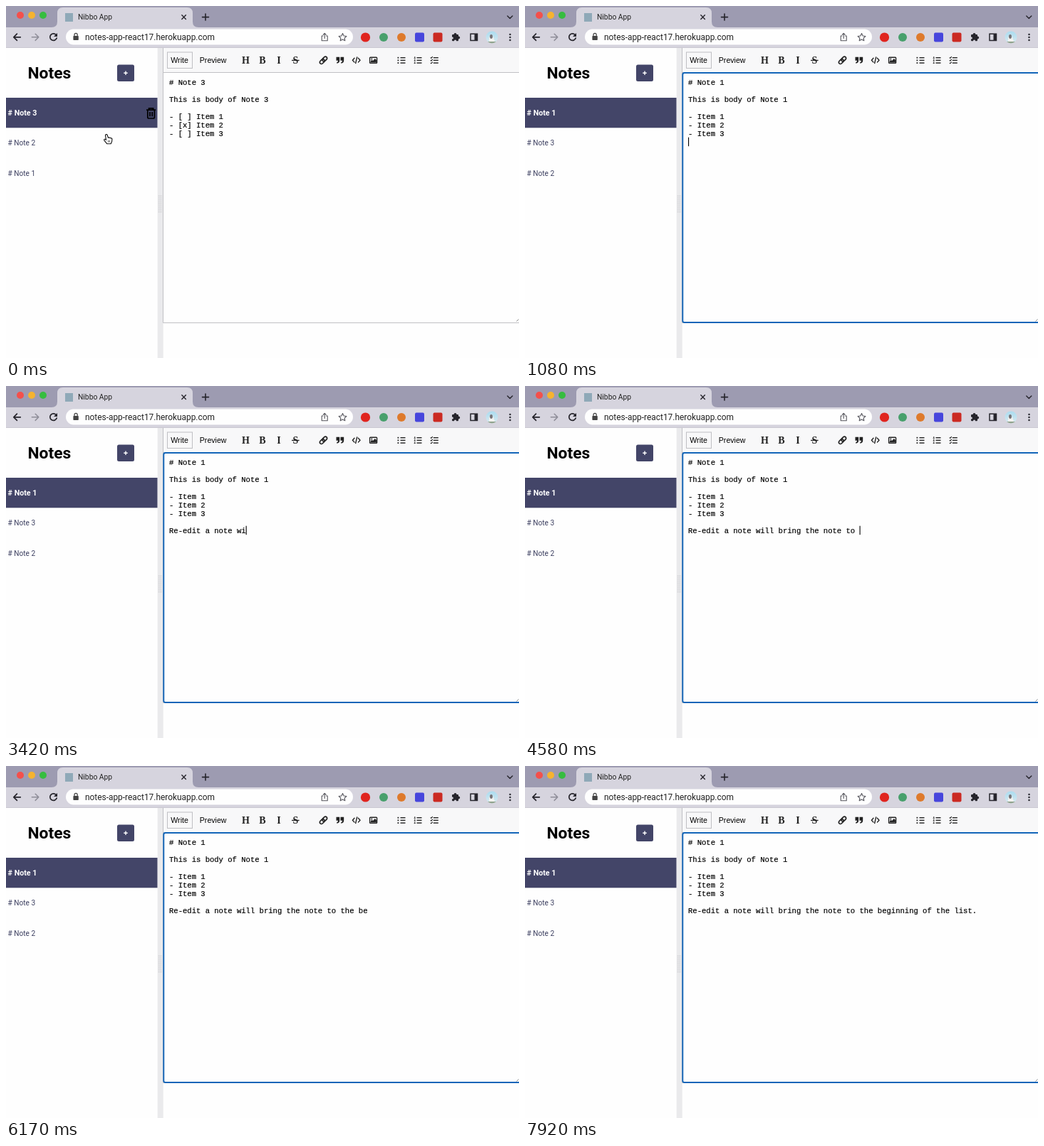
Animation, 720 px wide and 495 px high, one loop 8 s. Source, as an HTML page:

```html
<!DOCTYPE html>
<html lang="en">
<head>
<meta charset="utf-8">
<title>Notes</title>
<style>
  html, body { margin: 0; width: 100%; height: 100%; overflow: hidden; background: #fff; }
  svg { display: block; width: 100%; height: 100%; }
  text { white-space: pre; }
  .ui { font-family: Roboto, Inter, sans-serif; }
  .bar { font: 10.6px "Liberation Sans", Arial, sans-serif; }
  .mono { font: 10.55px "Liberation Mono", "Courier New", monospace; fill: #000; stroke: #000; stroke-width: .2; }
  .serif { font: bold 14px "Liberation Serif", serif; text-anchor: middle; }
  .line { fill: none; stroke-linecap: round; stroke-linejoin: round; }
</style>
</head>
<body>
<svg viewBox="0 0 720 495">
  <defs>
    <linearGradient id="sky" x1="0" y1="0" x2="0" y2="1">
      <stop offset="0" stop-color="#a9dcf0"/>
      <stop offset="1" stop-color="#dce9ee"/>
    </linearGradient>
    <clipPath id="face"><circle cx="682" cy="44" r="8.5"/></clipPath>
  </defs>
  <rect width="720" height="495" fill="#fefefe"/>

  <!-- browser frame -->
  <rect width="720" height="31" fill="#9d9bb1"/>
  <rect y="30" width="720" height="28" fill="#d6d4de"/>
  <rect y="58" width="720" height="1" fill="#cac8d1"/>
  <path d="M64 30q8 0 8-8V10q0-8 8-8H254q8 0 8 8V22q0 8 8 8z" fill="#d6d4de"/>
  <circle cx="20" cy="13" r="5" fill="#f4504b"/>
  <circle cx="36" cy="13" r="5" fill="#f6b32f"/>
  <circle cx="52" cy="13" r="5" fill="#36bd3f"/>
  <rect x="83" y="10" width="11" height="12" fill="#8fa9b8"/>
  <text class="ui" x="101" y="19.3" font-size="10.3" fill="#222">Nibbo App</text>
  <g class="line" stroke="#26252c" stroke-width="1.4">
    <path d="M246.8 12.8l5.6 5.6m0-5.6l-5.6 5.6"/>
    <path d="M275.5 15.6h9m-4.5-4.5v9" stroke-width="1.6"/>
    <path d="M703.8 14l3.5 3.5 3.5-3.5"/>
    <path d="M20.3 43.8H10.8m4.6-4.6l-4.6 4.6 4.6 4.6" stroke-width="1.7"/>
    <path d="M36.3 43.8h9.5m-4.6-4.6l4.6 4.6-4.6 4.6" stroke="#8e8d98" stroke-width="1.5"/>
    <path d="M70.6 41a4.8 4.8 0 1 0 .6 4" stroke-width="1.7"/>
  </g>
  <path d="M72 38v5h-5z" fill="#26252c"/>
  <rect x="84" y="32.5" width="403" height="22" rx="11" fill="#fefefe"/>
  <rect x="94.4" y="42" width="7.4" height="6" rx=".8" fill="#444"/>
  <path d="M96 42.5v-2a2.1 2.1 0 0 1 4.2 0v2" fill="none" stroke="#444" stroke-width="1.2"/>
  <text class="ui" x="111" y="47.8" font-size="11.9" fill="#222">notes-app-react17.herokuapp.com</text>
  <g class="line" stroke="#55555c" stroke-width="1.1">
    <path d="M445 42h-1.8v6.7h8V42h-1.8M447.2 45.5v-7m-2 1.9l2-2 2 2"/>
    <path d="M472.5 38.6l1.6 3.4 3.8.5-2.8 2.6.7 3.7-3.3-1.8-3.3 1.8.7-3.7-2.8-2.6 3.8-.5z"/>
  </g>
  <circle cx="504.5" cy="44" r="6.6" fill="#e0241e"/>
  <circle cx="530" cy="44" r="6" fill="#48a06c"/>
  <circle cx="555" cy="44" r="6" fill="#de7a2c"/>
  <rect x="574" y="37.5" width="13" height="13" rx="2" fill="#4746dc"/>
  <rect x="599.5" y="37.5" width="13" height="13" rx="2" fill="#cb2a22"/>
  <g fill="#26252c">
    <rect x="626" y="40" width="9" height="9.3" rx="1"/>
    <circle cx="630.5" cy="39.8" r="1.9"/>
    <circle cx="635.2" cy="44.5" r="1.9"/>
  </g>
  <g fill="#d6d4de"><circle cx="626.3" cy="45" r="1.6"/><circle cx="630.5" cy="49.2" r="1.6"/></g>
  <rect x="652" y="39.2" width="9.5" height="9.3" fill="none" stroke="#26252c" stroke-width="1.5"/>
  <rect x="657.5" y="39" width="4" height="9.5" fill="#26252c"/>
  <g clip-path="url(#face)">
    <rect x="673" y="35" width="18" height="18" fill="url(#sky)"/>
    <path d="M678 53V44q3-5 6 0l3 9z" fill="#f3f3f0"/>
    <path d="M673 50h18v4h-18z" fill="#8fa38d"/>
    <ellipse cx="681" cy="43" rx="2" ry="3" fill="#77757a"/>
  </g>
  <g fill="#26252c">
    <circle cx="707.5" cy="40" r="1.25"/><circle cx="707.5" cy="44" r="1.25"/><circle cx="707.5" cy="48" r="1.25"/>
  </g>

  <!-- page -->
  <text class="ui" x="30.5" y="102" font-size="22.8" font-weight="700">Notes</text>
  <rect x="156" y="82.5" width="24" height="23.5" rx="2.5" fill="#434568"/>
  <path d="M165.3 94.2h5.4m-2.7-2.7v5.4" stroke="#fff" stroke-width="1.4"/>
  <g id="list"></g>
  <rect x="212.7" y="59" width="8" height="436" fill="#eaeaec"/>
  <g id="grip" fill="#c2c2c6"></g>

  <!-- editor -->
  <rect x="220.5" y="59" width="500" height="34.5" fill="#f8f8f9"/>
  <path d="M220.5 59V445.5H720M220.5 93.5H720" fill="none" stroke="#c0c0c4"/>
  <rect x="226.5" y="65" width="35" height="22.5" fill="#f8f8f9" stroke="#bfbfc3"/>
  <text class="bar" x="231.3" y="80.3">Write</text>
  <text class="bar" x="271.8" y="80.3">Preview</text>
  <g fill="#222">
    <text class="serif" x="336.5" y="81">H</text>
    <text class="serif" x="360" y="81">B</text>
    <text class="serif" x="383" y="81" font-style="italic">I</text>
    <text class="serif" x="406.3" y="81">S</text>
    <rect x="401" y="75.8" width="10.6" height="1.3"/>
    <path id="quote" d="M463.5 71.8h4.7v4.8q0 4-3.9 4.2v-1.7q1.7-.2 1.8-2.3h-2.6z"/>
    <use href="#quote" x="6"/>
  </g>
  <g class="line" stroke="#222" stroke-width="1.7">
    <g transform="translate(445.5 76.3) rotate(-45)">
      <rect x="-6.3" y="-2.3" width="7.6" height="4.6" rx="2.3"/>
      <rect x="-1.3" y="-2.3" width="7.6" height="4.6" rx="2.3"/>
    </g>
    <path d="M489 73.3l-2.6 2.9 2.6 2.9m5.4-5.8l2.6 2.9-2.6 2.9m-1.7-7.2l-2 8.6" stroke-width="1.4"/>
    <rect x="510.6" y="72.2" width="10" height="8" rx=".8" stroke-width="1.4"/>
  </g>
  <path d="M511.8 79.2v-1.7l1.8-1.8 1.4 1.3 2.9-2.9 2 2v3.1z" fill="#222"/>
  <circle cx="513.3" cy="74.4" r="1" fill="#222"/>
  <g id="lists" fill="#222"></g>
  <path d="M719.5 440.5l-3 3" stroke="#888"/>
  <rect id="focus" x="221.3" y="94" width="505" height="351" rx="2.5" fill="none" stroke="#1265b8" stroke-width="1.9"/>
  <g id="body"></g>
  <rect id="caret" width="1.1" height="12.5" fill="#000"/>

  <g id="hand">
    <path d="M-3.5-4.8a1.4 1.4 0 0 1 2.7-.7L.4-1.7q1.2-.8 2 .2 1.2-.6 1.8.5 1.4-.4 1.7 1.1L5.6 3.5 4.2 6.7H-1.4L-5 2.2q-1-1.5.5-1.9 1-.2 2 1z" fill="#fff" stroke="#111" stroke-width="1.1" stroke-linejoin="round"/>
    <path d="M.6 2v2.6m1.8-2.6v2.6" stroke="#111" stroke-width=".7"/>
  </g>
  <path id="beam" d="M-2.3-6.5q2.3 0 2.3 1.5V5q0 1.5-2.3 1.5M2.3-6.5Q0-6.5 0-5m0 10q0 1.5 2.3 1.5" fill="none" stroke="#111"/>
</svg>
<script>
const $ = id => document.getElementById(id);
const LOOP = 8000, STEP = 1000 / 12;
const ROW = 42.3, TOP = 129, CHAR = 6.33, LINE = 12, LEFT = 229;
const PICK = 410, FOCUS = 830, EDIT = 1000;

const rect = (x, y, w, h) => `<rect x="${x}" y="${y}" width="${w}" height="${h}"/>`;
const note = (n, marks) => `# Note ${n}\n\nThis is body of Note ${n}\n\n` +
  marks.map((m, i) => `- ${m}Item ${i + 1}`).join("\n");
const NOTE3 = note(3, ["[ ] ", "[x] ", "[ ] "]);
const NOTE1 = note(1, ["", "", ""]);
const TYPED = "\n\nRe-edit a note will bring the note to the beginning of the list.";

// bursts of typing: first key, last key, number of keys
const keys = [[EDIT, 1330, 2], [1750, 3400, 17], [3450, 4570, 21], [4750, 5580, 6], [6250, 7330, 20]]
  .flatMap(([a, b, n]) => Array.from({ length: n }, (_, i) => a + (b - a) * i / (n - 1)));

const path = [[-90, 165, 150], [0, 143, 187], [330, 67, 233], [580, 67, 233], [830, 310, 190]];
function pointer(t) {
  const i = path.findIndex(p => p[0] >= t);
  if (i < 0) return path[path.length - 1].slice(1);
  if (i === 0) return path[0].slice(1);
  const [a, b] = [path[i - 1], path[i]];
  const u = (t - a[0]) / (b[0] - a[0]), k = u * u * (3 - 2 * u);
  return [1, 2].map(j => a[j] + (b[j] - a[j]) * k);
}

function trash(y) {
  return `<g transform="translate(203.6 ${y})" fill="none" stroke="#000" stroke-width="1.7">
    <path d="M-6.5-4.8h13M-3-5v-2.2h6V-5M-4.8-4.5V5.2q0 1.8 1.8 1.8h6q1.8 0 1.8-1.8V-4.5M-1.6-2v6.2M1.6-2v6.2"/></g>`;
}

function drawList(t) {
  const order = t < EDIT ? [3, 2, 1] : [1, 3, 2];
  const active = t < PICK ? 3 : 1;
  const [hx, hy] = pointer(t - STEP);
  const hover = hx < 213 ? Math.floor((hy - TOP) / ROW) : -1;
  $("list").innerHTML = order.map((n, i) => {
    const y = TOP + i * ROW, on = n === active;
    const style = on ? `font-size="10.7" font-weight="700" fill="#fff"` : `font-size="10.1" fill="#3c3f60"`;
    return (on ? `<rect y="${y}" width="212.7" height="${ROW}" fill="#434568"/>` : "") +
      `<text class="ui" x="2.6" y="${y + 25}" ${style}># Note ${n}</text>` +
      (i === hover ? trash(y + 22) : "");
  }).join("");
}

function drawBody(t) {
  const done = keys.filter(k => k <= t);
  const lines = (t < PICK ? NOTE3 : NOTE1 + TYPED.slice(0, done.length)).split("\n");
  $("body").innerHTML = lines.map((s, i) =>
    `<text class="mono" x="${LEFT}" y="${111 + i * LINE}">${s}</text>`).join("");
  const last = done.length ? done[done.length - 1] : FOCUS;
  const lit = t >= FOCUS && (t - last) % 1000 < 500;
  const row = lines.length - 1;
  $("caret").setAttribute("x", LEFT + lines[row].length * CHAR);
  $("caret").setAttribute("y", 100.7 + row * LINE);
  show("caret", lit);
  show("focus", t >= FOCUS);
}

function show(id, on) { $(id).setAttribute("visibility", on ? "visible" : "hidden"); }

function drawPointer(t) {
  const [x, y] = pointer(t), inList = x < 213;
  for (const id of ["hand", "beam"]) {
    $(id).setAttribute("transform", `translate(${x} ${y})`);
    show(id, t < EDIT && inList === (id === "hand"));
  }
}

$("grip").innerHTML = Array.from({ length: 27 }, (_, i) =>
  rect(213.8 + i % 3 * 1.9, 266.5 + Math.floor(i / 3) * 2.8, .9, 1.3)).join("");

$("lists").innerHTML = [549.5, 572.5, 595.8].map((x, kind) => [0, 1, 2].map(i => {
  const y = 72 + i * 3.7;
  const mark = kind === 0 ? rect(x, y - .2, 1.8, 1.8)
    : kind === 1 ? rect(x + .8, y - .9, 1, 2.6) + rect(x, y + 1, 2.4, .6)
    : `<path d="M${x} ${y + .4}l1 1 2-2.2" fill="none" stroke="#222" stroke-width="1.1"/>`;
  return mark + rect(x + 4, y, 7, 1.4);
}).join("")).join("");

let shown = -1;
function tick(now) {
  const step = Math.floor((now % LOOP + 4) / STEP) % 96;
  if (step !== shown) {
    shown = step;
    const t = step * STEP;
    drawList(t);
    drawBody(t);
    drawPointer(t);
  }
  requestAnimationFrame(n => tick(n - start));
}
const start = performance.now();
tick(0);
</script>
</body>
</html>
```
